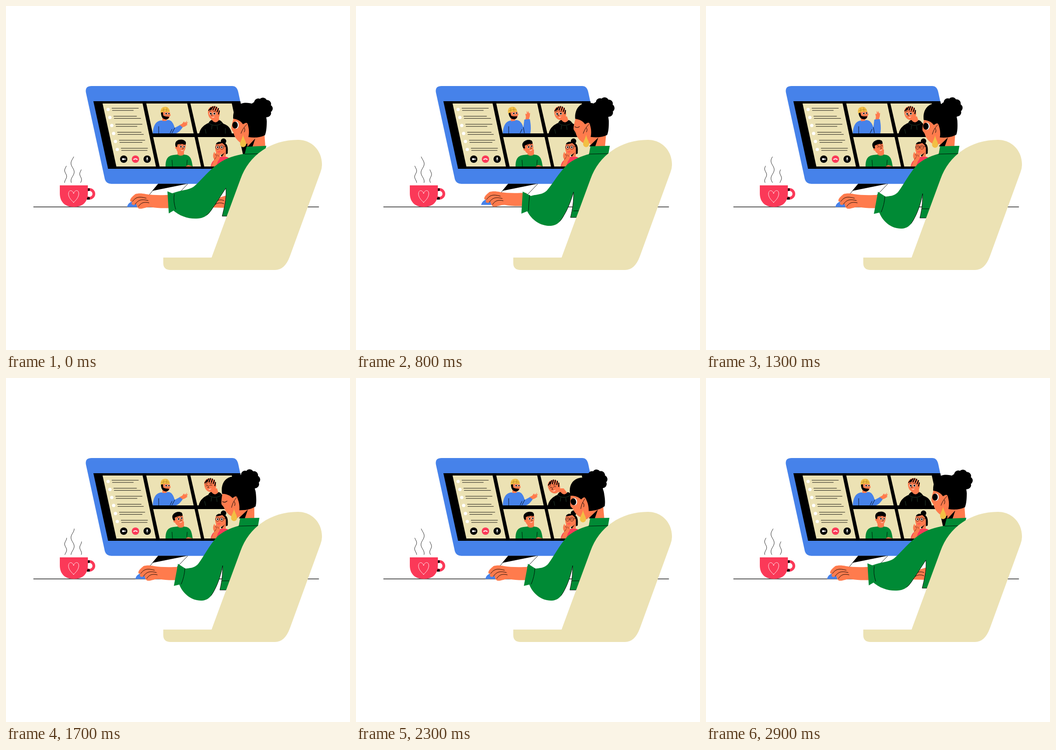
An HTML page for the animation above (3 s loop, 748x748 px).

```html
<!DOCTYPE html>
<html lang="en">
<head>
<meta charset="utf-8">
<title>Video call</title>
<style>
html, body { margin: 0; width: 100%; height: 100%; overflow: hidden; background: #fff; }
svg { display: block; width: 100vw; height: 100vh; }
.ln { fill: none; stroke: #000; stroke-width: 1; stroke-linecap: round; stroke-linejoin: round; }
.skin { fill: #ff7b4d; }
.green { fill: #008a35; }
.blue { fill: #4682ea; }
.cream { fill: #ece2b4; }
.red { fill: #fb3958; }
.gold { fill: #f2bf44; }
.wht { fill: #fff; }
</style>
</head>
<body>
<svg viewBox="0 0 748 748" xmlns="http://www.w3.org/2000/svg">
  <path class="blue" d="M186 174H492Q502 174 505 187L548 386.700H229Q218 386.700 215 377L174 189Q171 174 186 174Z"/>
  <path d="M190 207H509.500L541 354H222Z"/>
  <g class="cream">
    <path d="M210 212H297L326 349H240Z"/>
    <path d="M305 212H394L408 277H319Z"/>
    <path d="M401 212H491L505 277H416Z"/>
    <path d="M320 285H410L424 349H334Z"/>
    <path d="M417 285H507L521 349H431Z"/>
  </g>
  <g id="list"></g>
  <circle cx="256" cy="333" r="8"/>
  <path class="wht" d="M252.500 331H257.500V335H252.500ZM258 332.500L260 331V335L258 333.500Z"/>
  <circle class="red" cx="281.500" cy="333" r="8"/>
  <path d="M277.500 334.500C278.500 331.500 284.500 331.500 285.500 334.500" fill="none" stroke="#fff" stroke-width="1.800"/>
  <circle cx="307" cy="333" r="8"/>
  <rect class="wht" x="305.600" y="329" width="2.800" height="5" rx="1.400"/>
  <path class="ln" d="M304.500 333Q307 337.500 309.500 333M307 335.500V337.500" style="stroke:#fff;stroke-width:.7"/>

  <g id="people"></g>

  <path class="wht" d="M331 387H395L372 412H312Z"/>
  <path d="M331 386.500H395L318 402Z"/>
  <path class="ln" d="M331 387L312 410M395 387L371 412" style="stroke-width:.9"/>
  <path class="ln" d="M60 436.800H680" style="stroke-width:1.300"/>

  <circle cx="181.500" cy="408.500" r="9.500" fill="none" stroke="#fb3958" stroke-width="6"/>
  <path d="M176 396.500H182V402H176ZM176 415.500H182V421H176Z"/>
  <path class="red" d="M117 390H178V407C178 426 167 437 147.500 437C128 437 117 426 117 407Z"/>
  <path class="ln" style="stroke:#fff;stroke-width:.9" d="M147 427C139 420 135 413 136 407C137 399 145 400 147 408C149 400 157 399 158 406C159 413 155 420 147 427Z"/>

  <g id="steam"></g>
  <g id="worker"></g>

  <path class="cream" d="M447 547L510 376C528 325 575 291 635 291C665 291 688 315 687 346Q687 353 684 361L617 545Q606 574 585 574H358Q342 574 342 559V547Z"/>
</svg>
<script>
const LOOP = 3000, STEP = 100;
const $ = id => document.getElementById(id);

const lerp = (a, b, p) => a + (b - a) * p;
const ease = (t, a, b) => {
  const u = Math.min(1, Math.max(0, (t - a) / (b - a)));
  return u * u * (3 - 2 * u);
};
const pulse = (t, a, b, c, d) => ease(t, a, b) - ease(t, c, d);
const near = (t, ...marks) => marks.some(m => Math.abs(t - m) < 101);

// Blends two paths that share the same commands.
function blend(a, b, p) {
  const to = b.match(/-?[\d.]+/g);
  let i = 0;
  return a.replace(/-?[\d.]+/g, n => lerp(+n, +to[i++], p).toFixed(2));
}

const path = (cls, d, style = '') => `<path class="${cls}" d="${d}" style="${style}"/>`;
const line = (d, w = .9, color = '#000') => path('ln', d, `stroke-width:${w};stroke:${color}`);
const dot = (cls, x, y, rx, ry = rx) => `<ellipse class="${cls}" cx="${x}" cy="${y}" rx="${rx}" ry="${ry}"/>`;
const group = (tf, body) => `<g transform="${tf}">${body}</g>`;

function eye(x, y, shut, r = 3) {
  return shut
    ? line(`M${x - r} ${y}q${r} ${-r} ${2 * r} 0`, .8)
    : dot('wht', x, y, r) + dot('', x + .2, y, r * .7);
}

function list() {
  const ends = [[288, 277], [284, 293], [296, 285], [294, 299], [302, 296], [308, 307]];
  return ends.map(([a, b], i) => {
    const x = 222 + i * 4, y = 225 + i * 17.4;
    return dot('wht', x, y, 3.6) +
      line(`M${x + 8.3} ${y - 2.7}H${a}M${x + 9.3} ${y + 2}H${b}`);
  }).join('');
}

function speaker(t) {
  const up = pulse(t, 450, 800, 1350, 1700);
  const shirt = blend(
    'M319 277C320 263 324 251 336 249L354 248C361 249 364 256 367 265L378 259L384 264C380 270 374 277 368 277Z',
    'M319 277C320 263 324 251 336 249L350 248C357 249 361 255 364 264L366 247L378 246C380 256 381 268 379 277Z', up);
  const hand = 'M-2-2L4-5L8-10L10-7L15-12L13-7L17-9L14-4L16-3L10 1L2 4Z';
  const head =
    path('skin', 'M340 230H356L358 238L356 240C355 245 352 247 349 246V250H340Z') +
    path('', 'M337 231H341L342 238C346 241 350 240 355 241C353 246 349 248 345 246C340 245 337 240 337 231Z') +
    path('gold', 'M336 232C336 222 340 219 347 219C354 220 356 225 356 231L346 230Z') +
    line('M338 227Q346 224 355 227M343 222L342 230M350 221L349 230', .5, '#8a6420') +
    eye(348, 234, near(t, 400), 2.4) + eye(354, 234, near(t, 400), 2.2);
  return group(`translate(${lerp(379, 371, up)} ${lerp(261, 247, up)}) rotate(${-52 * up})`, path('skin', hand)) +
    path('blue', shirt) +
    line('M332 262V277M361 268L357 276') + line(blend('M367 265L361 276', 'M364 264L366 276', up)) +
    group(`translate(${-3 * up} 0) rotate(${-8 * up} 345 249)`, head);
}

function hoodieMan(t) {
  const lean = pulse(t, 100, 400, 2400, 2900), far = pulse(t, 1750, 2300, 2400, 2900);
  const shift = -7 * lean - 12 * far;
  const shut = t >= 1600 && t <= 2450;
  const head =
    path('skin', 'M439 229C440 221 446 217 453 218C461 219 465 225 465 235C464 244 458 249 451 248C443 246 439 240 439 229Z') +
    line('M441 227L446 221M445 226L450 219M450 226L454 218.500M455 227L458 220M459 230L462 223M462 235L464 228', 2.2) +
    eye(445, 234, shut, 2.7) + eye(453, 234, shut, 2.8) +
    line('M442 230L446 229M451 229L456 230M448 235L446 238L449 238', .7) +
    path('wht', 'M446 241Q450 243 454 240Q451 245 446 241Z');
  return path('skin', `M${447 + shift * .6} 240H${463 + shift * .6}L464 256H446Z`) +
    group(`translate(${shift * .15} 0)`,
      path('', 'M420 277C423 264 432 258 441 254C443 249 446 248 448 248C453 255 459 254 463 248C469 249 470 254 473 256C485 260 489 268 491 277Z') +
      line('M441 254C446 261 464 262 470 253M448 260L447 268M459 261L460 269M433 268L435 277M477 266V277', .7, '#315640')) +
    group(`translate(${shift} ${3 * far}) rotate(${-5 * lean - 8 * far} 452 244)`, head);
}

function sweaterMan(t) {
  const tilt = -16 * pulse(t, 100, 700, 1800, 2900);
  const shut = near(t, 400, 1300);
  const head =
    path('skin', 'M370 300C369 312 372 321 380 320C387 320 391 312 391 301L388 296H372Z') +
    dot('skin', 371, 308, 3) +
    path('', 'M369 306C367 301 368 295 372 293C376 290 383 290 387 292C392 294 392 299 390 302C384 299 379 300 373 301L372 307Z') +
    eye(380, 306, shut, 2.4) + eye(387, 306, shut, 2.3) +
    line('M378 302H381M385 302H388M384 307L386 310L383 311', .7) +
    path('wht', 'M379 313Q383 315 387 313Q383 317 379 313Z');
  return path('skin', 'M373 312H387V328H373Z') +
    path('green', 'M347 349C347 335 350 326 364 324L373 323Q380 328 387 323L393 324C403 327 404 338 406 349Z') +
    line('M361 335L362 349M394 335L393 348', .8) +
    path('skin', 'M391 349Q394 345 400 347L406 349Z') +
    group(`rotate(${tilt} 380 324)`, head);
}

function glassesWoman(t) {
  const shut = near(t, 400, 1300, 2300);
  return dot('', 473, 294, 6) +
    path('', 'M456 304C456 296 463 294 469 296C480 297 484 304 482 321L472 324Z') +
    path('skin', 'M456 301C454 309 455 318 460 322C464 325 467 324 469 321V329H478V309C477 303 473 300 470 298C465 300 460 300 456 301Z') +
    path('red', 'M445 349C447 337 455 331 466 328H480C490 332 495 340 496 349Z') +
    path('', 'M467 324Q472 323 477 317L469 328Z') +
    path('skin', 'M446 349L453 334C449 328 450 322 453 317L455 322L458 316L460 323L465 321C467 325 465 333 461 337L457 349Z') +
    line('M453 334L457 329M456 322L458 327M460 323L462 327M470 338L472 349', .6) +
    eye(460, 307, shut, 2.6) + eye(469, 307, shut, 2.6) +
    line('M455.500 307a4.300 4.300 0 1 0 8.600 0a4.300 4.300 0 1 0-8.600 0M465 307a4.300 4.300 0 1 0 8.600 0a4.300 4.300 0 1 0-8.600 0M473.600 306L479 305', .7) +
    path('red', 'M459 316Q463 318 467 315Q464 321 459 316Z');
}

function steam(t) {
  const wisp = (x, top, amp, len) => {
    let d = '';
    for (let y = top; y <= 384; y += 2) {
      const a = 2 * Math.PI * ((y - top) / len - (t - 200) / 1500);
      d += `${d ? 'L' : 'M'}${(x + amp * Math.cos(a)).toFixed(2)} ${y}`;
    }
    return line(d, .8);
  };
  return wisp(129.7, 348, 2.2, 26) + wisp(144.8, 328, 3.5, 38) + wisp(162.3, 356, 2, 25);
}

function bun() {
  let s = dot('', 556, 223, 18);
  for (let i = 0; i < 9; i++) {
    const a = i * Math.PI * 2 / 9;
    s += dot('', 556 + 15 * Math.cos(a), 223 + 15 * Math.sin(a), 9);
  }
  return s;
}

function workerHead(shut) {
  return path('skin', 'M497 230L494 247C492 254 490 262 490 267C491 271 494 272 495 277C497 286 506 298 520 302L537 290V240Z') +
    (shut ? line('M493 262Q498 266 503 262', 1.1) : dot('wht', 500, 259, 6, 8) + dot('', 498, 259, 6, 7.5)) +
    path('', 'M494 245C493 229 500 214 516 211C538 208 566 222 567 250C567 264 566 274 563 281C553 286 541 287 527 285C529 276 529 264 524 255L515 257C511 250 502 246 494 245Z') +
    path('skin', 'M510 279C508 267 515 254 523 254C530 257 525 277 514 283Z') +
    line('M511 277C514 268 519 262 524 257M518 265Q521 269 518 274') +
    bun();
}

function worker(t) {
  const body = pulse(t, 500, 850, 2400, 2850);
  const hand = pulse(t, 500, 1100, 2400, 2850);
  const nod = pulse(t, 800, 2400, 2400, 2850);
  const arm = (body + hand) / 2;
  const lift = -4.5 * Math.sin(Math.PI * hand);

  const farHand = path('skin', 'M444 438C450 424 460 416 480 412V439Z') +
    line('M455 425Q465 419 474 423M454 432Q463 425 474 430');

  const mouseHand =
    path('blue', 'M263 437C265 429 272 424 281 424L293 437Z') +
    path('skin', 'M362 411C338 411 319 412 304 409C295 407 287 407 281 409C275 414 269 419 270 424Q271 427 275 425Q271 430 275 432Q278 434 283 430Q284 436 288 440C295 443 303 437 314 437C330 440 346 440 362 439Z') +
    line('M275 425C282 416 288 413 305 418M281 431C287 422 294 419 309 423M288 436C293 428 300 425 311 428');

  const sleeve = blend(
    'M522 321C500 324 478 330 460 344C436 362 424 380 408 393C397 401 378 400 360 408L362 443C378 458 400 464 418 462C440 460 446 444 454 433C462 421 470 408 478 396C480 420 474 440 470 457L520 457L600 400L566 321Z',
    'M507 321C484 327 470 336 460 344C442 364 430 388 418 404C408 415 400 412 384 416L376 447C384 470 405 485 426 484C444 483 450 468 456 456C462 444 468 425 471 408C471 425 470 440 465 461L520 461L600 400L552 321Z', arm);
  const seam = blend(
    'M436 455C446 447 448 440 454 433C462 421 470 408 478 396C480 420 474 440 470 457L482 457M480 457L482 457',
    'M446 473C450 468 453 462 456 456C462 444 468 425 471 408C471 425 470 440 465 461L478 461M470 441L485 441', arm);
  const cuff = blend('M351 403L368 410L369 442L354 451Z', 'M374 404L391 415L382 448L365 452Z', hand);
  const cuffLine = blend('M366 409Q363 424 369 442', 'M389 414Q388 432 381 448', hand);
  const collar = blend('M523 306L566 304L562 322L519 322Z', 'M509 305L551 304L548 322L506 322Z', body);
  const collarLine = blend('M519 322L562 321', 'M506 322L548 321', body);

  const x = 514 - 18 * body - 6 * nod, y = 268 + 7 * nod, turn = -body - 9.7 * nod;
  const neck = `M${x + 10} ${y + 8}L${x + 47.5} ${y + 4}L${lerp(564, 540, body)} 307H${lerp(525, 509, body)}Z`;
  const shade = blend('M525 306L542 288L536 306Z', 'M506 305L526 286L519 306Z', body);
  const drop = 'M0 0C.5 8 6.500 15 6.500 21C6.500 30-6.500 30-6.500 21C-6.500 15-.5 8 0 0Z';

  return group(`translate(${30 * body} 0)`, farHand) +
    group(`translate(${18 * hand} ${lift})`, mouseHand) +
    path('green', sleeve) + line(seam) +
    path('green', cuff) + line(cuffLine) +
    path('skin', neck) +
    group(`translate(${x} ${y}) rotate(${turn}) translate(-514 -268)`, workerHead(near(t, 800, 1700))) +
    path('', shade) +
    path('green', collar) + line(collarLine) +
    group(`translate(${x + 1.5 + 2 * body} ${y + 11})`, path('gold', drop));
}

function draw(t) {
  $('people').innerHTML = speaker(t) + hoodieMan(t) + sweaterMan(t) + glassesWoman(t);
  $('steam').innerHTML = steam(t);
  $('worker').innerHTML = worker(t);
}

$('list').innerHTML = list();
const start = performance.now();
let last = -1;
function tick() {
  const t = Math.floor((performance.now() - start) % LOOP / STEP) * STEP;
  if (t !== last) draw(last = t);
  requestAnimationFrame(tick);
}
tick();
</script>
</body>
</html>
```
